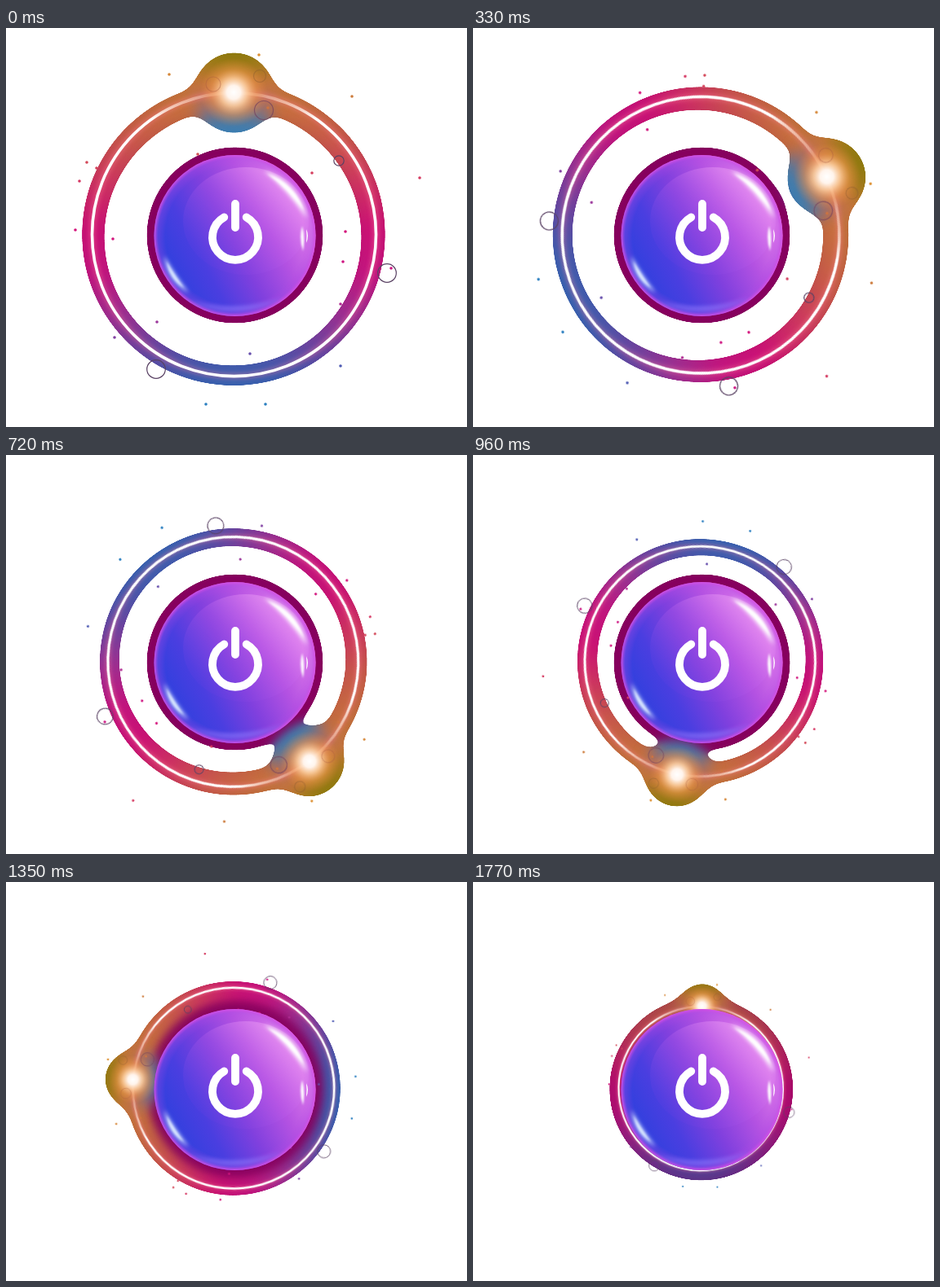
An HTML page that plays this animation: 565x490 px, repeating every 1.8 s.

```html
<!DOCTYPE html>
<html lang="en">
<head>
<meta charset="utf-8">
<title>Power button</title>
<style>
html, body { margin: 0; width: 100%; height: 100%; overflow: hidden; background: #fff; }
svg { display: block; width: 565px; height: 490px; }

/* One picture every 30 ms; each segment steps once per picture. */
.spin { transform-origin: 278.8px 253.6px; animation: orbit 1800ms infinite; }
@keyframes orbit {
  0%       { transform: rotate(0deg) scale(1);        animation-timing-function: steps(5); }
  8.3333%  { transform: rotate(29.7deg) scale(.994);  animation-timing-function: steps(6); }
  18.3333% { transform: rotate(65.3deg) scale(.976);  animation-timing-function: steps(13); }
  40%      { transform: rotate(142.7deg) scale(.882); animation-timing-function: steps(8); }
  53.3333% { transform: rotate(191.6deg) scale(.812); animation-timing-function: steps(8); }
  66.6667% { transform: rotate(243.7deg) scale(.753); animation-timing-function: steps(11); }
  85%      { transform: rotate(312.6deg) scale(.656); animation-timing-function: steps(8); }
  98.3333%, 100% { transform: rotate(361deg) scale(.579); }
}
.soft { filter: url(#soft); }
.goo { filter: url(#goo); }
.line, .bubbles, .icon { fill: none; }
</style>
</head>
<body>
<svg viewBox="0 0 565 490" xmlns="http://www.w3.org/2000/svg">
  <defs>
    <filter id="soft" filterUnits="userSpaceOnUse" x="0" y="0" width="565" height="490" color-interpolation-filters="sRGB">
      <feGaussianBlur stdDeviation="9"/>
    </filter>
    <filter id="goo" filterUnits="userSpaceOnUse" x="0" y="0" width="565" height="490" color-interpolation-filters="sRGB">
      <feColorMatrix values="1 0 0 0 0  0 1 0 0 0  0 0 1 0 0  0 0 0 50 -24"/>
    </filter>
    <filter id="blur3" x="-50%" y="-50%" width="200%" height="200%"><feGaussianBlur stdDeviation="2.6"/></filter>
    <filter id="blur1" x="-50%" y="-50%" width="200%" height="200%"><feGaussianBlur stdDeviation="1"/></filter>

    <linearGradient id="hue" gradientUnits="userSpaceOnUse" x1="0" y1="30" x2="0" y2="462">
      <stop offset="0" stop-color="#de9232"/>
      <stop offset=".13" stop-color="#cc7a3c"/>
      <stop offset=".25" stop-color="#d05c4c"/>
      <stop offset=".37" stop-color="#d63664"/>
      <stop offset=".5" stop-color="#d4127a"/>
      <stop offset=".63" stop-color="#cc1684"/>
      <stop offset=".75" stop-color="#a53298"/>
      <stop offset=".84" stop-color="#7048a8"/>
      <stop offset=".92" stop-color="#3c66ba"/>
      <stop offset="1" stop-color="#2a7fc0"/>
    </linearGradient>
    <linearGradient id="drop" gradientUnits="userSpaceOnUse" x1="0" y1="30" x2="0" y2="128">
      <stop offset="0" stop-color="#807804"/>
      <stop offset=".2" stop-color="#a47a1c"/>
      <stop offset=".42" stop-color="#cc7440"/>
      <stop offset=".65" stop-color="#b06a60"/>
      <stop offset=".85" stop-color="#4a7aa4"/>
      <stop offset="1" stop-color="#2f80bc"/>
    </linearGradient>
    <radialGradient id="glow">
      <stop offset="0" stop-color="#fff"/>
      <stop offset=".2" stop-color="#fff4ec"/>
      <stop offset=".4" stop-color="#ffd0a0" stop-opacity=".85"/>
      <stop offset=".68" stop-color="#f8a050" stop-opacity=".42"/>
      <stop offset="1" stop-color="#e88a40" stop-opacity="0"/>
    </radialGradient>
    <linearGradient id="streak" gradientUnits="userSpaceOnUse" x1="0" y1="80" x2="0" y2="112">
      <stop offset="0" stop-color="#ffd8c0" stop-opacity=".35"/>
      <stop offset="1" stop-color="#fff"/>
    </linearGradient>

    <linearGradient id="ball" gradientUnits="userSpaceOnUse" x1="203" y1="292" x2="362" y2="208">
      <stop offset="0" stop-color="#3340de"/>
      <stop offset=".2" stop-color="#4a3ee0"/>
      <stop offset=".45" stop-color="#8140de"/>
      <stop offset=".7" stop-color="#b452e2"/>
      <stop offset="1" stop-color="#e480ec"/>
    </linearGradient>
    <radialGradient id="edge">
      <stop offset=".86" stop-color="#b646e4" stop-opacity="0"/>
      <stop offset=".95" stop-color="#b048e4" stop-opacity=".3"/>
      <stop offset="1" stop-color="#d850e4" stop-opacity=".95"/>
    </radialGradient>
    <linearGradient id="lens" x1=".1" y1=".9" x2=".85" y2=".1">
      <stop offset="0" stop-color="#7a3ce4" stop-opacity=".08"/>
      <stop offset=".55" stop-color="#c868f0" stop-opacity=".22"/>
      <stop offset="1" stop-color="#f8b0f8" stop-opacity=".55"/>
    </linearGradient>
  </defs>

  <g class="goo">
    <g class="soft"><circle cx="280.5" cy="254.5" r="108" fill="#86005e"/></g>
    <g class="soft">
      <g class="spin">
        <!-- the hole sits lower than the rim, so the band is thicker by the drop -->
        <path fill="url(#hue)" fill-rule="evenodd" d="M93.3 253.4a185.7 185.7 0 1 0 371.4 0a185.7 185.7 0 1 0-371.4 0zM120 257a158 158 0 1 0 316 0a158 158 0 1 0-316 0z"/>
        <g fill="none" stroke="#200020" stroke-opacity=".2" stroke-width="5">
          <circle cx="279" cy="253.4" r="183"/>
          <circle cx="278" cy="257" r="160.5"/>
        </g>
      </g>
    </g>
    <g class="soft"><g class="spin"><circle cx="279.5" cy="79.5" r="49.5" fill="url(#drop)"/></g></g>
  </g>

  <g class="spin">
    <g class="line">
      <circle cx="279.5" cy="253.6" r="174" stroke="#ff8098" stroke-opacity=".32" stroke-width="8" filter="url(#blur3)"/>
      <circle cx="279.5" cy="253.6" r="174" stroke="url(#streak)" stroke-width="3.6"/>
    </g>
    <circle cx="279" cy="79" r="42" fill="url(#glow)"/>
    <path stroke="url(#hue)" stroke-width="3.6" stroke-linecap="round" d="M310 33h.01M200 57h.01M424 84h.01M235 155h.01M99 165h.01M111 172h.01M90 188h.01M375 178h.01M507 184h.01M85 248h.01M131 259h.01M416 250h.01M413 287h.01M472 295h.01M410 339h.01M185 361h.01M133 380h.01M299 400h.01M410 415h.01M245 462h.01M318 462h.01M321 98h.01M214 98h.01"/>
    <g class="bubbles" stroke="#5a4264" stroke-width="1.2">
      <circle cx="467" cy="301" r="11.3"/>
      <circle cx="184" cy="419" r="11.3"/>
      <circle cx="408" cy="163" r="6.2"/>
      <circle cx="316" cy="101" r="11.5" stroke="#70405e" stroke-opacity=".7"/>
      <circle cx="311" cy="59" r="7.5" stroke="#8a5a30" stroke-opacity=".45"/>
      <circle cx="254" cy="69" r="9" stroke="#a85a40" stroke-opacity=".4"/>
    </g>
  </g>

  <circle cx="280.5" cy="255" r="99" fill="url(#ball)"/>
  <ellipse cx="294" cy="237" rx="77" ry="66" fill="url(#lens)"/>
  <circle cx="280.5" cy="255" r="99" fill="url(#edge)"/>
  <g fill="#fff">
    <path d="M316 175Q358 189 369 234Q346 199 316 175Z" filter="url(#blur3)"/>
    <path d="M320 179Q354 193 365 224Q347 197 320 179Z" filter="url(#blur1)" opacity=".9"/>
    <path d="M194 280Q197 310 224 325Q209 306 194 280Z" fill="#c4d8ff" filter="url(#blur3)"/>
    <path d="M197 287Q201 308 218 319Q207 305 197 287Z" fill="#dceaff" filter="url(#blur1)" opacity=".9"/>
    <path d="M225 335Q282 362 340 331Q283 351 225 335Z" fill="#8a80ff" filter="url(#blur3)" opacity=".6"/>
    <path d="M363 243Q359 258 364 274Q367 258 363 243Z" filter="url(#blur1)"/>
    <path d="M368 247Q372 255 368 264Q369 255 368 247Z"/>
  </g>
  <path class="icon" d="M267.3 232.4A28 28 0 1 0 294.7 232.4M281 216V245" stroke="#fff" stroke-width="9.8" stroke-linecap="round"/>
</svg>
</body>
</html>
```
